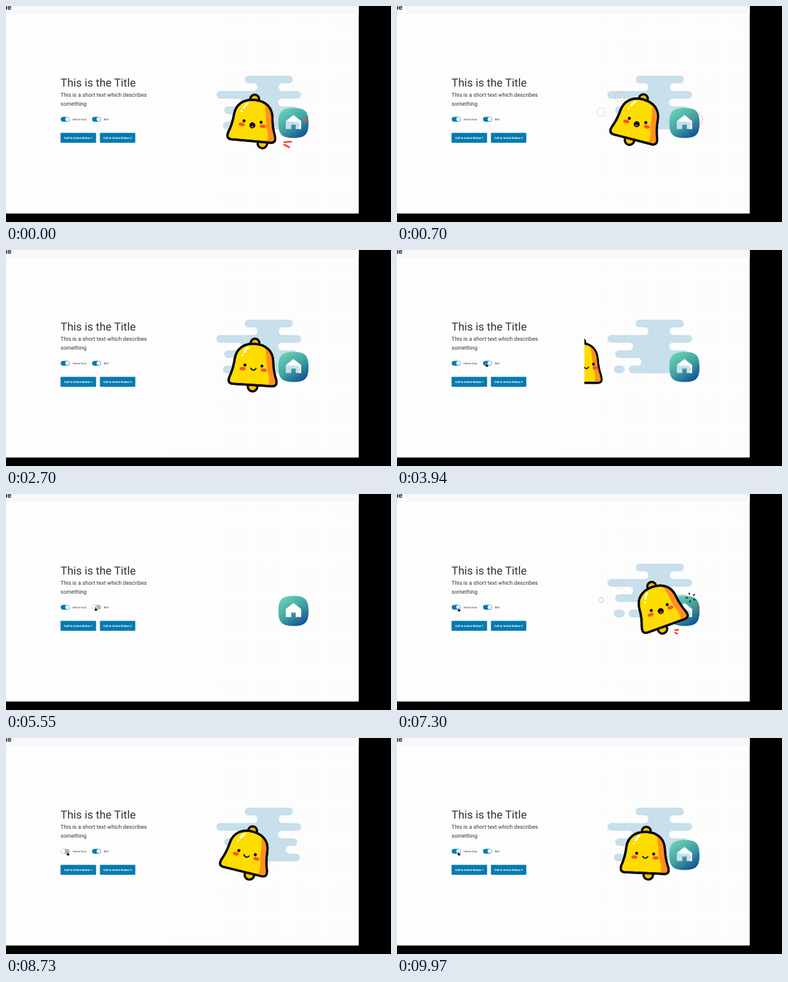
An HTML page that plays this animation: 600x338 px, repeating every 10 s.

```html
<!DOCTYPE html>
<html lang="en">
<head>
<meta charset="utf-8">
<title>Title page with bell</title>
<style>
html, body { margin: 0; width: 100%; height: 100%; overflow: hidden; background: #000; }
svg { display: block; width: 600px; height: 338px; }
text { font-family: Roboto, sans-serif; fill: #30343a; text-rendering: geometricPrecision; }
.lead { font-size: 8.6px; }
.label { font-size: 4.35px; }
.btn { font-size: 4.4px; font-weight: 700; fill: #fff; }
</style>
</head>
<body>
<svg viewBox="0 0 600 338">
  <defs>
    <pattern id="dots" width="7" height="7" x="240" y="16" patternUnits="userSpaceOnUse">
      <circle cx="3.5" cy="3.5" r=".5" fill="#e0e3e8"/>
    </pattern>
    <linearGradient id="fade" x1="236" x2="360" y1="0" y2="0" gradientUnits="userSpaceOnUse">
      <stop offset="0" stop-color="#fff" stop-opacity="0"/>
      <stop offset="1" stop-color="#fff"/>
    </linearGradient>
    <mask id="dotMask"><rect x="236" width="314" height="338" fill="url(#fade)"/></mask>
    <linearGradient id="teal" x1=".15" y1="0" x2=".85" y2="1">
      <stop offset="0" stop-color="#6cd6b5"/>
      <stop offset=".5" stop-color="#42a2a3"/>
      <stop offset="1" stop-color="#0c4a92"/>
    </linearGradient>
    <clipPath id="player"><rect x="292" y="90" width="230" height="150"/></clipPath>
    <path id="body" d="M0 23C18 23 28.5 33 30 48C31 60 33 68 36.2 76Q40 87 31 87.5H-31Q-40 87 -36.2 76C-33 68 -31 60 -30 48C-28.5 33 -18 23 0 23Z"/>
    <clipPath id="bodyClip"><use href="#body"/></clipPath>
  </defs>

  <rect width="549.7" height="324.7" fill="#fdfdfe"/>
  <rect x="236" y="14" width="313" height="310" fill="url(#dots)" mask="url(#dotMask)"/>
  <rect width="549.7" height="13" fill="#f6f8fa"/>
  <text x="8.4" y="6" text-anchor="end" font-size="11.5" font-weight="700">le</text>

  <text x="85" y="125.8" font-size="17.4">This is the Title</text>
  <text class="lead" x="85" y="142.4">This is a short text which describes</text>
  <text class="lead" x="85" y="155.6">something</text>

  <g id="homeSwitch" transform="translate(85.3 173.4)"></g>
  <text class="label" x="104" y="178.8">Home Icon</text>
  <g id="bellSwitch" transform="translate(134.1 173.4)"></g>
  <text class="label" x="152.6" y="178.8">Bell</text>

  <rect x="85" y="198.5" width="55.4" height="15.5" rx="1" fill="#067ab0"/>
  <text class="btn" x="112.8" y="207.7" text-anchor="middle">Call to Action Button 1</text>
  <rect x="146.4" y="198.5" width="55.1" height="15.5" rx="1" fill="#067ab0"/>
  <text class="btn" x="173.9" y="207.7" text-anchor="middle">Call to Action Button 2</text>

  <path id="cloud" fill="#c8dfec"/>
  <path id="home" fill="url(#teal)" fill-rule="evenodd" d="M448 159.5C466 159.5 471.5 165 471.5 183S466 206.5 448 206.5S424.5 201 424.5 183S430 159.5 448 159.5ZM448 170.5L460 180V192.5H451.5V185.5H444.5V192.5H436V180Z"/>

  <g id="scene" clip-path="url(#player)">
    <g id="bell" stroke="#0b0b0b" stroke-width="3.5" stroke-linecap="round" stroke-linejoin="round">
      <ellipse cx="0" cy="21.5" rx="6.8" ry="6.6" fill="#f5b800"/>
      <circle id="clapper" cy="90" r="7.4" fill="#ffc400"/>
      <use href="#body" fill="#ffdc00"/>
      <path clip-path="url(#bodyClip)" stroke="none" fill="#ff9021" d="M11 18C22 34 18 54 24 69Q28 83 22 90H46V18Z"/>
      <use href="#body" fill="none"/>
      <path d="M-10.5 29.5Q-14 32 -16 37M-18.6 42V42.2" stroke="#fff" stroke-width="3" fill="none"/>
      <g id="face">
        <g stroke="none">
          <g fill="#ff5335">
            <ellipse cx="-16.8" cy="63" rx="4.8" ry="2.7"/>
            <ellipse cx="16.2" cy="63" rx="4.8" ry="2.7"/>
          </g>
          <g fill="#0b0b0b">
            <circle cx="-13.5" cy="57" r="2.4"/>
            <circle cx="13" cy="57" r="2.4"/>
          </g>
        </g>
        <path id="smile" d="M-4.1 61.5Q0 67 4.1 61.5" fill="none" stroke-width="2"/>
        <g id="open" stroke="none">
          <circle cy="63" r="4.7" fill="#0b0b0b"/>
          <ellipse cy="65" rx="2" ry="1.2" fill="#ff5335"/>
        </g>
      </g>
    </g>
    <g id="sparks" fill="none" stroke-linecap="round"></g>
  </g>

  <path id="cursor" fill="#111" stroke="#fff" stroke-width=".5" d="M-1.4 -3Q-.6 -3.8 0 -3V-.8L2 -.4Q2.6 0 2.4 1.2L1.8 3H-1.2L-2.8 .8Q-2.4 0 -1.4 .6Z"/>
</svg>

<script>
const LOOP = 10000, CYCLE = 4.8;
const BELL_OFF = 4.2, BELL_ON = 6.26, HOME_OFF = 8.2, HOME_ON = 9.5;
const $ = id => document.getElementById(id);
const set = (el, attrs) => { for (const k in attrs) el.setAttribute(k, attrs[k]); };
const show = (el, on) => { el.style.display = on ? '' : 'none'; };
const clamp = u => Math.min(1, Math.max(0, u));
const smooth = u => (1 - Math.cos(Math.PI * clamp(u))) / 2;

function add(parent, tag, attrs) {
  const el = document.createElementNS('http://www.w3.org/2000/svg', tag);
  set(el, attrs);
  parent.appendChild(el);
  return el;
}

// Interpolate a [time, value] table with sine easing.
function track(keys, t) {
  if (t <= keys[0][0]) return keys[0][1];
  for (let i = 1; i < keys.length; i++) {
    const [t0, a] = keys[i - 1], [t1, b] = keys[i];
    if (t < t1) return a + (b - a) * smooth((t - t0) / (t1 - t0));
  }
  return keys[keys.length - 1][1];
}

const swing = [[0, 0], [.25, -10], [.6, 14], [1.04, -20], [1.58, 20], [2.12, -19], [2.52, 15], [3.05, -8], [3.5, 4], [4, 0]];
const clap = [[0, 0], [.4, -10], [.75, 18], [1.04, -7], [1.25, -15], [1.75, 15], [2.17, -11], [2.5, 12], [3.1, -9], [3.7, 6], [4.2, 0], [4.65, -16]];
const pointerX = [[3.3, 490], [3.75, 140], [6.5, 140], [6.95, 96.5]];
const pointerY = [[3.3, 205], [3.75, 180], [6.5, 180], [6.95, 181]];

// Cloud bands alternate between rounded bars and rounded notches.
function cloudPath() {
  const right = [447, 425, 460, 424, 454, 436, 458];
  const left = [372, 392, 328, 368, 340, 381, 361];
  let d = 'M378 109';
  right.forEach((x, i) => {
    const bar = i % 2 === 0;
    d += `H${bar ? x - 6 : x + 6}a6 6 0 0 ${bar ? 1 : 0} 0 12`;
  });
  for (let i = 6; i >= 0; i--) {
    const bar = i % 2 === 0;
    d += `H${bar ? left[i] + 6 : left[i] - 6}a6 6 0 0 ${bar ? 1 : 0} 0 -12`;
  }
  return d + 'ZM344 181H349a6 6 0 0 1 0 12H344a6 6 0 0 1 0 -12Z';
}
$('cloud').setAttribute('d', cloudPath());

function makeSwitch(id) {
  const g = $(id);
  const bar = add(g, 'rect', { width: 14, height: 7.6, rx: 3.8 });
  const knob = add(g, 'circle', { cy: 3.8, r: 3.1, fill: '#fff' });
  return on => {
    const c = [180, 182, 184].map((v, i) => Math.round(v + ([6, 122, 176][i] - v) * on));
    set(bar, { fill: `rgb(${c})` });
    set(knob, { cx: 3.7 + 6.6 * on });
  };
}
const homeSwitch = makeSwitch('homeSwitch'), bellSwitch = makeSwitch('bellSwitch');

const sparks = [];
const spark = (tag, from, to, attrs, draw) =>
  sparks.push({ el: add($('sparks'), tag, attrs), from, to, draw });

function ring(cx, cy, from, to, stroke, r0, r1) {
  spark('circle', from, to, { cx, cy, stroke, 'stroke-width': 1.3 }, (el, u) =>
    set(el, { r: r0 + (r1 - r0) * u, opacity: Math.sin(Math.PI * u) }));
}

function burst(x, y, from, to) {
  spark('path', from, to, { stroke: '#111', 'stroke-width': 1.9 }, (el, u) => {
    let d = '';
    const a = 3.5 + 4.5 * u, b = a + 2.4 * (1 - u * .6);
    for (let i = 0; i < 5; i++) {
      const w = i * Math.PI * .4 - .7, c = Math.cos(w), s = Math.sin(w);
      d += `M${x + a * c} ${y + a * s}L${x + b * c} ${y + b * s}`;
    }
    set(el, { d });
  });
}

ring(347, 142, 1.01, 1.5, '#f19a68', 6.8, 8);
ring(318, 166, .94, 1.5, '#79b7d8', 3.2, 7);
ring(347, 142, 1.9, 2.44, '#f08f58', 6.2, 8);
ring(446, 133, 1.92, 2.44, '#94c4dc', 6.2, 8);
burst(458, 162, .85, 1.3);
burst(321, 158.5, 1.98, 2.38);

spark('circle', .7, 1.55, { cx: 466, cy: 178, stroke: '#f4533c', 'stroke-dasharray': '.1 3' }, (el, u) =>
  set(el, { r: 1.2 + 10 * u, 'stroke-width': u < .15 ? 3 : 1.7, opacity: 1 - u * .6 }));
spark('path', .55, 1.25, { stroke: '#f4442e', 'stroke-width': 2.6 }, (el, u, p) => {
  const k = p < .75 ? (p - .55) / .2 : (1.25 - p) / .5;
  set(el, { d: `M433.5 213L${433.5 + 11 * k} ${213 - k * .8}M433.5 217L${433.5 + 8 * k} ${217 + 4 * k}` });
});

function drawBell(p) {
  const out = clamp((p - 4.2) / .6), left = 1 - clamp(p / .45);
  const x = 389.5 - 152 * (out * out + left * left);
  const scale = `${1 - .2 * out} ${1 - .05 * out}`;
  set($('bell'), { transform: `translate(${x} 124) rotate(${track(swing, p)}) scale(${scale})` });
  set($('face'), { transform: `translate(${11 * out} 0)` });
  set($('clapper'), { cx: track(clap, p) });
  const singing = p > .5 && p < 1.5;
  show($('open'), singing);
  show($('smile'), !singing);
  for (const { el, from, to, draw } of sparks) {
    const on = p >= from && p < to;
    show(el, on);
    if (on) draw(el, (p - from) / (to - from), p);
  }
}

function render(t) {
  const bellOn = t < BELL_OFF || t >= BELL_ON;
  const homeOn = t < HOME_OFF || t >= HOME_ON;
  const level = (off, on) => 1 - smooth((t - off) / .15) + smooth((t - on) / .15);
  bellSwitch(level(BELL_OFF, BELL_ON));
  homeSwitch(level(HOME_OFF, HOME_ON));
  show($('home'), homeOn);
  show($('cloud'), bellOn);
  show($('scene'), bellOn);
  if (bellOn) drawBell(t < BELL_OFF ? (t + .75) % CYCLE : t - BELL_ON);
  show($('cursor'), t >= 3.3);
  set($('cursor'), { transform: `translate(${track(pointerX, t)} ${track(pointerY, t)})` });
}

const start = performance.now();
function tick() {
  render(((performance.now() - start) % LOOP) / 1000);
  requestAnimationFrame(tick);
}
tick();
</script>
</body>
</html>
```
